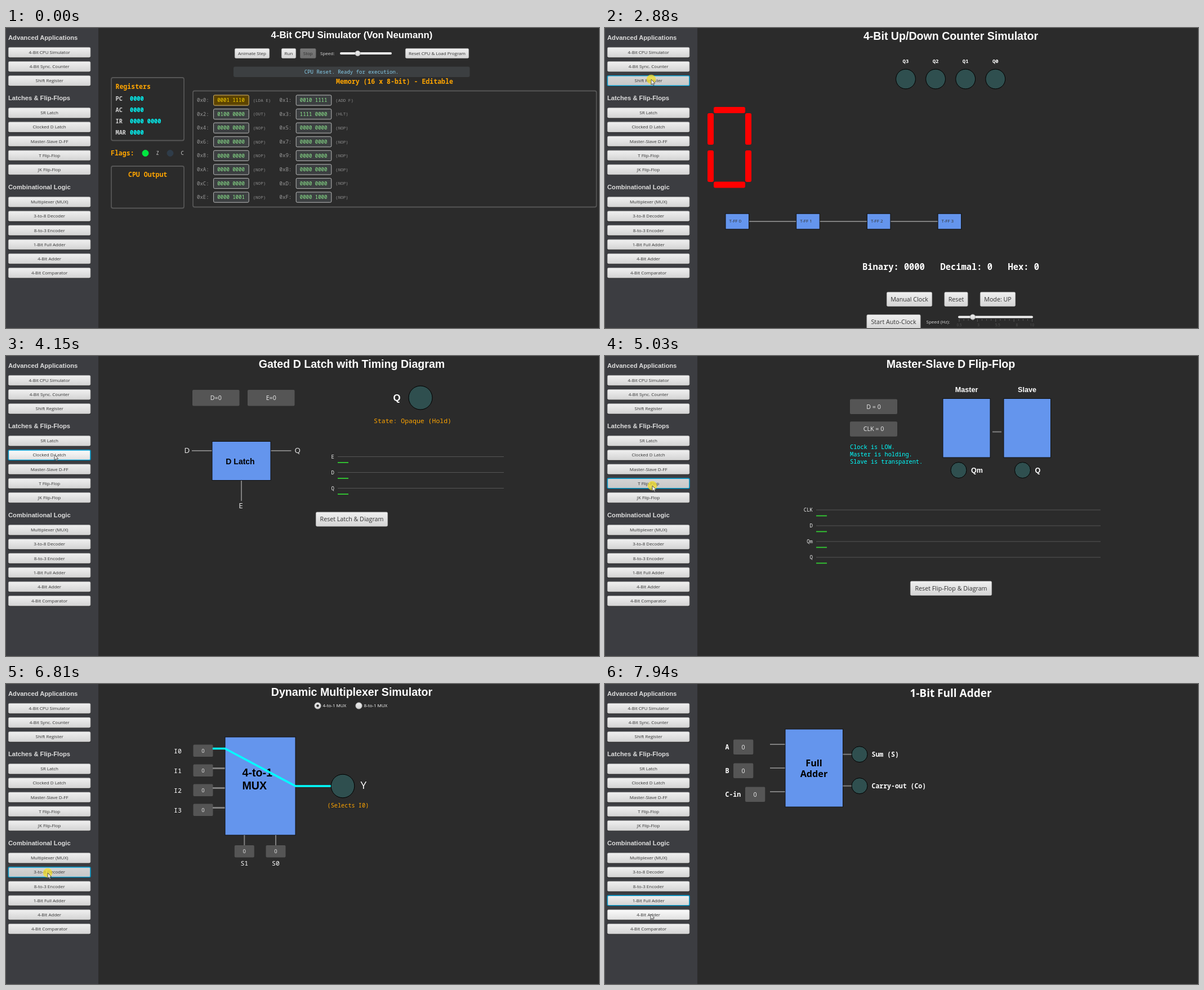
Animation, 1053 px wide and 532 px high, one loop 8000 ms. Source, as an HTML page:

```html
<!DOCTYPE html>
<html lang="en">
<head>
<meta charset="utf-8">
<title>Digital logic simulator</title>
<style>
html, body { margin: 0; width: 100%; height: 100%; overflow: hidden; background: #2b2b2b; }
svg { display: block; width: 100%; height: 100%; }
text { white-space: pre; }
.sans { font-family: "Open Sans", sans-serif; }
.arial { font-family: "Liberation Sans", Arial, sans-serif; font-weight: bold; }
.mono { font-family: "Noto Sans Mono", monospace; }
.bold { font-weight: bold; }
.btn { fill: url(#face); stroke: #b9b9b9; stroke-width: .8; }
.btn.hover { fill: url(#light); }
.btn.down { fill: url(#dark); }
.btn.focus { stroke: #0c9bcb; stroke-width: 1.6; }
</style>
</head>
<body>
<svg id="stage" viewBox="0 0 1053 532" preserveAspectRatio="none"></svg>
<script>
const BLUE = '#6495ed', GREY = '#808080', CYAN = '#00ffff', ORANGE = '#ffa500', LED = '#2f4f4f';
const MID = 614;

const text = (s, x, y, size, fill = '#fff', font = 'sans', anchor = 'start') =>
  `<text x="${x}" y="${y}" font-size="${size}" fill="${fill}" class="${font}" text-anchor="${anchor}">${s.replace(/&/g, '&amp;')}</text>`;
const centred = (s, x, y, size, fill, font) => text(s, x, y, size, fill, font, 'middle');
const rect = (x, y, w, h, fill, extra = '') =>
  `<rect x="${x}" y="${y}" width="${w}" height="${h}" fill="${fill}" ${extra}/>`;
const line = (points, color = GREY, width = 2) =>
  `<polyline points="${points}" fill="none" stroke="${color}" stroke-width="${width}"/>`;
const disc = (x, y, r, fill = LED, stroke = '#000') =>
  `<circle cx="${x}" cy="${y}" r="${r}" fill="${fill}" stroke="${stroke}"/>`;
const block = (x, y, w, h) => rect(x, y, w, h, BLUE, 'stroke="#111"');
const panel = (x, y, w, h) => rect(x, y, w, h, 'none', 'stroke="#565656" stroke-width="1.8" rx="3"');
const title = s => centred(s, MID, 20.5, 19.6, '#fff', 'arial');
const segoeTitle = s => centred(s, MID, 23.2, 19, '#fff', 'sans bold');
const each = (list, fn) => [...list].map(fn).join('');
const range = (n, fn) => each(Array(n).keys(), fn);

const button = (x, y, w, h, label, size = 10.7) =>
  rect(x, y + .8, w, h, '#1c1c1c', 'rx="2"') +
  `<rect class="btn" x="${x + .4}" y="${y + .4}" width="${w - .8}" height="${h - .8}" rx="2"/>` +
  centred(label, x + w / 2, y + h / 2 + size * .35, size, '#333');
const toggle = (x, y, w, h, label, size = 10.7) =>
  rect(x, y, w, h, '#555', 'rx="2"') +
  centred(label, x + w / 2, y + h / 2 + size * .36, size, '#eee');
const slider = (x, y, w, thumb) =>
  rect(x, y - 2, w, 4, '#eee', 'rx="2"') + disc(thumb, y, 4.6, 'url(#face)', '#aaa');
const timing = (labels, x0, x1, y0) => each(labels, (s, i) => {
  const y = y0 + i * 28;
  return text(s, x0 - 6, y + 3.3, 9, '#eee', 'mono', 'end') +
    line([x0, y, x1, y], '#555', 1) + line([x0, y + 10.4, x0 + 19, y + 10.4], '#32cd32', 1.8);
});

function cpu() {
  const ops = { 0: ['0001 1110', '(LDA E)'], 1: ['0010 1111', '(ADD F)'], 2: ['0100 0000', '(OUT)'],
    3: ['1111 0000', '(HLT)'], 14: ['0000 1001', '(NOP)'], 15: ['0000 1000', '(NOP)'] };
  const heading = (s, x, y) => text(s, x, y, 11.55, ORANGE, 'mono bold');
  const cell = i => {
    const x = 339 + i % 2 * 146.6, y = 128 + (i >> 1) * 24.57;
    const [bits, name] = ops[i] || ['0000 0000', '(NOP)'];
    return text(`0x${i.toString(16).toUpperCase()}:`, x, y + 3.2, 9, '#999', 'mono') +
      rect(x + 29.6, y - 9, 62.6, 18.2, i ? '#3c3f41' : '#5c4300', `rx="2" stroke="${i ? '#bbb' : '#d8b56a'}"`) +
      centred(bits, x + 60.5, y + 3.3, 9, i ? '#90ee90' : '#ffd700', 'mono') +
      text(name, x + 99.5, y + 2.8, 7.6, '#8c8c8c', 'mono');
  };
  return centred('4-Bit CPU Simulator (Von Neumann)', MID, 18, 16.8, '#fff', 'arial') +
    button(406, 36, 62, 18, 'Animate Step', 8) + button(489, 36, 26, 18, 'Run', 8) +
    `<g opacity=".4">${button(522, 36, 28.5, 18, 'Stop', 8)}</g>` +
    text('Speed:', 558, 47.6, 8, '#ddd') + slider(593, 45, 92, 624.5) +
    button(709, 36, 113, 18, 'Reset CPU & Load Program', 8) +
    rect(404, 68.5, 419.5, 18.5, '#3c3f41', 'rx="3"') +
    centred('CPU Reset. Ready for execution.', 613.5, 81, 9, '#87ceeb', 'mono') +
    heading('Memory (16 x 8-bit) - Editable', 586, 99.3) +
    panel(187, 88, 129, 111.5) + heading('Registers', 194.5, 107.5) +
    each([['PC', '0000'], ['AC', '0000'], ['IR', '0000 0000'], ['MAR', '0000']], ([name, bits], i) =>
      text(name, 194.5, 129 + i * 20.1, 10.25, '#d3d3d3', 'mono bold') +
      text(bits, 220, 129 + i * 20.1, 10.25, CYAN, 'mono bold')) +
    heading('Flags:', 186, 226) +
    disc(247.5, 222, 5.5, '#00e640', '#00e640') + text('Z', 266.5, 225.2, 9, '#ccc', 'mono') +
    disc(291.5, 222, 5.5, '#2f3c49', '#2f3c49') + text('C', 310.5, 225.2, 9, '#ccc', 'mono') +
    panel(187, 245, 129, 74.5) + heading('CPU Output', 217, 264) +
    panel(332, 111.5, 716.5, 206) + range(16, cell);
}

function counter() {
  const segments = [[193, 140, 56, 11], [193, 272.5, 56, 11], [182, 151, 11, 56],
    [249, 151, 11, 56], [182, 217, 11, 56], [249, 217, 11, 56]];
  return title('4-Bit Up/Down Counter Simulator') +
    range(4, i => centred('Q' + (3 - i), 534 + i * 53.1, 62, 9, '#fff', 'mono bold') +
      disc(534 + i * 53.1, 90.5, 17.4)) +
    each(segments, s => rect(...s, '#f00', 'rx="3"')) +
    line([255, 343, 591, 343]) +
    range(4, i => block(214 + i * 125.7, 329.2, 41.5, 27.6) +
      text('T-FF ' + i, 220.5 + i * 125.7, 345.2, 8, '#333')) +
    text('Binary: 0000   Decimal: 0   Hex: 0', 457, 429, 15.4, '#fff', 'mono bold') +
    button(500, 468, 81, 26, 'Manual Clock') + button(602.5, 468, 42, 26, 'Reset') +
    button(666, 468, 63, 26, 'Mode: UP') + button(464.5, 508, 96, 26, 'Start Auto-Clock') +
    text('Speed (Hz):', 570.5, 523.6, 8, '#ddd') +
    range(17, i => line([629 + i * 8.1, 516, 629 + i * 8.1, i % 4 ? 519 : 521], '#666', .8)) +
    each(['0.5', '3', '5.5', '8', '10'], (s, i) => centred(s, i < 4 ? 629 + i * 34.1 : 758.5, 528.5, 6.4, '#555')) +
    slider(627, 512.5, 133, 653);
}

const shift = () => title('4-Bit Shift Register Simulator') +
  range(4, i => centred('Q' + (3 - i), 534 + i * 53.1, 62, 9, '#fff', 'mono bold') +
    disc(534 + i * 53.1, 90.5, 17.4)) +
  line([349, 234, 879, 234]) +
  range(4, i => block(390 + i * 126, 200, 70, 68) + centred('D-FF ' + (3 - i), 425 + i * 126, 238, 10.7, '#111')) +
  toggle(430, 330, 84, 27, 'Data = 0') + toggle(530, 330, 84, 27, 'Mode: SISO') +
  text('Binary: 0000', 640, 349, 15.4, '#fff', 'mono bold') +
  button(520, 420, 81, 26, 'Clock Pulse') + button(622, 420, 84, 26, 'Reset');

const srLatch = () => title('SR Latch with Timing Diagram') +
  toggle(331, 60, 84, 28, 'S=0') + toggle(429, 60, 84, 28, 'R=0') +
  each(['Q', "Q'"], (s, i) => text(s, 650 + i * 100, 80, 16.8, '#fff', 'arial') + disc(698 + i * 100, 74, 21, i ? '#00ff00' : LED)) +
  text('State: Hold', 653, 119, 11.5, ORANGE, 'mono') +
  block(366, 151, 104, 105) + centred('SR Latch', 418, 208, 14, '#000', 'arial') +
  each([175, 232], (y, i) => line([330, y, 366, y]) + line([470, y, 506, y]) +
    text('SR'[i], 317, y + 4, 13, '#eee') + text(['Q', "Q'"][i], 512, y + 4, 13, '#eee')) +
  timing(['S', 'R', 'Q', "Q'"], 375, 860, 300) + button(550, 430, 128, 26, 'Reset Latch & Diagram');

const dLatch = () => title('Gated D Latch with Timing Diagram') +
  toggle(331, 60, 83.5, 28.5, 'D=0') + toggle(429, 60, 83.5, 28.5, 'E=0') +
  text('Q', 687.5, 80, 16.8, '#fff', 'arial') + disc(736, 74, 21) +
  text('State: Opaque (Hold)', 653, 119, 11.5, ORANGE, 'mono') +
  line([330, 168, 366, 168]) + line([470, 168, 506.5, 168]) + line([418, 220, 418, 257]) +
  block(366, 151.5, 104, 69) + centred('D Latch', 416, 191.5, 14, '#000', 'arial') +
  text('D', 316.5, 172, 13.4, '#eee') + text('Q', 512.5, 172, 13.4, '#eee') + centred('E', 417, 269.7, 13.4, '#eee') +
  timing('EDQ', 589, 884, 178.5) + button(550, 276.5, 128, 26, 'Reset Latch & Diagram');

const masterSlave = () => title('Master-Slave D Flip-Flop') +
  toggle(435, 76.5, 84, 26.5, 'D = 0') + toggle(435, 116.3, 84, 26.5, 'CLK = 0') +
  each(['Clock is LOW.', 'Master is holding.', 'Slave is transparent.'], (s, i) =>
    text(s, 435, 164.5 + i * 13.3, 10.25, CYAN, 'mono')) +
  centred('Master', 642, 64.3, 12.6, '#fff', 'arial') + centred('Slave', 749.5, 64.3, 12.6, '#fff', 'arial') +
  block(600, 75.5, 84, 104.5) + block(708, 75.5, 83.5, 104.5) + line([688, 134.5, 704, 134.5]) +
  disc(628, 202.5, 14) + text('Qm', 650, 207, 12.6, '#fff', 'arial') +
  disc(741.5, 202.5, 14) + text('Q', 763.5, 207, 12.6, '#fff', 'arial') +
  timing(['CLK', 'D', 'Qm', 'Q'], 375, 880, 273) + button(542, 399, 145, 26, 'Reset Flip-Flop & Diagram');

const flipFlop = (name, inputs, x1, y0, buttonY) => title(`${name} Flip-Flop with Timing Diagram`) +
  each([...inputs, 'CLK'], (s, i) => toggle(340, 60 + i * 40, 84, 27, s + ' = 0')) +
  block(500, 75.5, 104, 104.5) + centred(name + ' FF', 552, 133, 14, '#000', 'arial') +
  line([464, 100, 500, 100]) + line([464, 155, 500, 155]) + line([604, 100, 640, 100]) +
  text('Q', 688, 106, 16.8, '#fff', 'arial') + disc(736, 100, 21) +
  timing(['CLK', ...inputs, 'Q'], x1 - 505, x1, y0) + button(542, buttonY, 145, 26, 'Reset Flip-Flop & Diagram');

const mux = () => title('Dynamic Multiplexer Simulator') +
  disc(553.5, 38.5, 5.6, 'url(#face)', '#bbb') + disc(553.5, 38.5, 2.3, '#333', 'none') + text('4-to-1 MUX', 562.5, 41.3, 8) +
  disc(626.5, 38.5, 5.6, 'url(#face)', '#bbb') + text('8-to-1 MUX', 635.5, 41.3, 8) +
  range(4, i => text('I' + i, 298, 123 + i * 35, 11.5, '#fff', 'mono') +
    toggle(332.5, 107.5 + i * 35, 35, 21.5, '0', 9.4) +
    line([367, 114.5 + i * 35, 389, 114.5 + i * 35], GREY, 3)) +
  block(389, 94, 125, 174) + text('4-to-1', 419.5, 164, 19.6, '#000', 'arial') + text('MUX', 419.5, 186.5, 19.6, '#000', 'arial') +
  line([367, 114.5, 389, 114.5, 514, 181, 578, 181], CYAN, 3.6) +
  disc(598, 181, 20.8) + text('Y', 629.5, 185.6, 19, '#fff') +
  text('(Selects I0)', 570.5, 219, 10.25, ORANGE, 'mono') +
  each([423.3, 479], (x, i) => line([x, 268, x, 286]) + toggle(x - 17.5, 286, 35, 21.5, '0', 9.4) +
    centred('S' + (1 - i), x, 322, 11.5, '#fff', 'mono'));

function coder(name, head, ins, outs) {
  const place = (n, i) => 80 + (i + .5) * 242 / n;
  return segoeTitle(head) + block(320, 80, 103, 242) +
    each(name.split(' '), (s, i) => centred(s, 371, 198 + i * 19, 16.2, '#000', 'sans bold')) +
    each(ins, (s, i) => { const y = place(ins.length, i);
      return text(s, 214, y + 4, 11.5, '#fff', 'mono bold') + toggle(249, y - 11, 35, 22, '0') + line([293, y, 320, y]); }) +
    each(outs, (s, i) => { const y = place(outs.length, i);
      return line([423, y, 438, y]) + disc(452, y, 12, s === 'Y0' ? '#00ff00' : LED) + text(s, 474, y + 4, 11.5, '#fff', 'mono bold'); });
}
const numbered = (s, n) => [...Array(n).keys()].map(i => s + i);

const adder = () => segoeTitle('1-Bit Full Adder') +
  each(['A', 'B', 'C-in'], (s, i) => text(s, 213.5, 116 + i * 42, 11.5, '#fff', 'mono bold') +
    toggle(i < 2 ? 228 : 249, 98.5 + i * 42, 35.3, 26.6, '0') + line([293, 107 + i * 42, 320, 107 + i * 42])) +
  block(320, 80, 102.5, 138) + centred('Full', 371, 145.5, 16.2, '#000', 'sans bold') + centred('Adder', 371, 164.5, 16.2, '#000', 'sans bold') +
  each(['Sum (S)', 'Carry-out (Co)'], (s, i) => line([422.5, 124.7 + i * 56, 438, 124.7 + i * 56]) +
    disc(452, 124.7 + i * 56, 14) + text(s, 473.5, 129 + i * 56, 11.5, '#fff', 'mono bold'));

const scenes = [cpu(), counter(), shift(), srLatch(), dLatch(), masterSlave(),
  flipFlop('T', ['T'], 915, 273, 399), flipFlop('JK', ['J', 'K'], 893, 300, 438), mux(),
  coder('3-to-8 Decoder', '3-to-8 Line Decoder Simulator', ['A2', 'A1', 'A0'], numbered('Y', 8)),
  coder('8-to-3 Encoder', '8-to-3 Line Encoder Simulator', numbered('I', 8), ['A2', 'A1', 'A0']), adder()];

const menu = [
  ['Advanced Applications', 43.2, ['4-Bit CPU Simulator', '4-Bit Sync. Counter', 'Shift Register']],
  ['Latches & Flip-Flops', 150.5, ['SR Latch', 'Clocked D Latch', 'Master-Slave D-FF', 'T Flip-Flop', 'JK Flip-Flop']],
  ['Combinational Logic', 308.5, ['Multiplexer (MUX)', '3-to-8 Decoder', '8-to-3 Encoder', '1-Bit Full Adder', '4-Bit Adder', '4-Bit Comparator']]];
const sidebar = rect(0, 0, 164, 532, '#3c3d41') + each(menu, ([head, y, items]) =>
  text(head, 4, y - 22.3, 11.2, '#ddd', 'arial') +
  each(items, (s, i) => button(4, y - 9.2 + i * 25.15, 146.3, 18.4, s, 8)));

const gradient = (id, top, bottom) => `<linearGradient id="${id}" x2="0" y2="1"><stop stop-color="${top}"/><stop offset="1" stop-color="${bottom}"/></linearGradient>`;
const stage = document.getElementById('stage');
stage.innerHTML = `<defs>${gradient('face', '#f0f0f0', '#d4d4d4')}${gradient('light', '#fbfbfb', '#e0e0e0')}${gradient('dark', '#d4d4d4', '#c8c8c8')}</defs>` +
  rect(0, 0, 1053, 532, '#2b2b2b') + `<g id="menu">${sidebar}</g>` +
  each(scenes, s => `<g class="scene">${s}</g>`) +
  `<g id="cursor"><circle id="halo" r="8.3" fill="#f0dc28" opacity=".75"/>
  <path d="M0 0V9.6L2.2 7.6L3.8 11L5.3 10.3L3.8 7H6.8Z" fill="#eee" stroke="#333" stroke-width=".8"/></g>`;

const groups = stage.querySelectorAll('.scene');
const items = [...document.querySelectorAll('#menu .btn')];
const cursor = document.getElementById('cursor'), halo = document.getElementById('halo');

// Times below count screen refreshes of 126 ms.
const clicks = [13, 17, 23, 28, 32, 37, 40, 43, 49, 54, 58, 62.5];
const path = [[1, 998, 522], [2, 609, 449], [7, 76, 114], [9, 86, 40], [10, 86, 50], [11, 86, 50], [13, 85, 55],
  [14, 85, 55], [16, 82, 67], [19, 82, 67], [21, 82, 91], [24, 82, 91], [25, 82, 111], [26, 84, 153], [29, 84, 153],
  [31, 86, 175], [33, 86, 175], [36, 85, 200], [38, 85, 200], [40, 84, 230], [41, 84, 230], [43, 84, 246],
  [44, 84, 246], [45, 79, 312], [51, 79, 312], [53, 74, 335], [55, 74, 335], [57, 78, 359], [59, 78, 359],
  [61, 80, 391], [62, 80, 391], [63, 81, 408]];

function pointer(k) {
  const i = path.findIndex(p => p[0] >= k);
  const b = path[i], a = path[i - 1] || b;
  const f = b === a ? 0 : (k - a[0]) / (b[0] - a[0]);
  return [a[1] + (b[1] - a[1]) * f, a[2] + (b[2] - a[2]) * f];
}

function draw(now) {
  const k = Math.min(63, Math.floor((now % 8000 + 30) / 126));
  const scene = Math.max(0, clicks.filter(c => c < k).length - 1);
  const focus = clicks.filter(c => c <= k).length - 1;
  const pressed = clicks.includes(k);
  const [x, y] = pointer(Math.max(1, k));
  groups.forEach((g, i) => g.style.display = i === scene ? '' : 'none');
  items.forEach((b, i) => {
    const top = +b.getAttribute('y');
    const over = k > 0 && x > 4 && x < 150 && y > top && y < top + 18;
    b.classList.toggle('focus', i === focus);
    b.classList.toggle('hover', over);
    b.classList.toggle('down', pressed && i === focus);
  });
  cursor.style.display = k ? '' : 'none';
  cursor.setAttribute('transform', `translate(${x} ${y})`);
  halo.style.display = pressed ? '' : 'none';
}

const start = performance.now();
(function loop() {
  draw(performance.now() - start);
  requestAnimationFrame(loop);
})();
</script>
</body>
</html>
```
